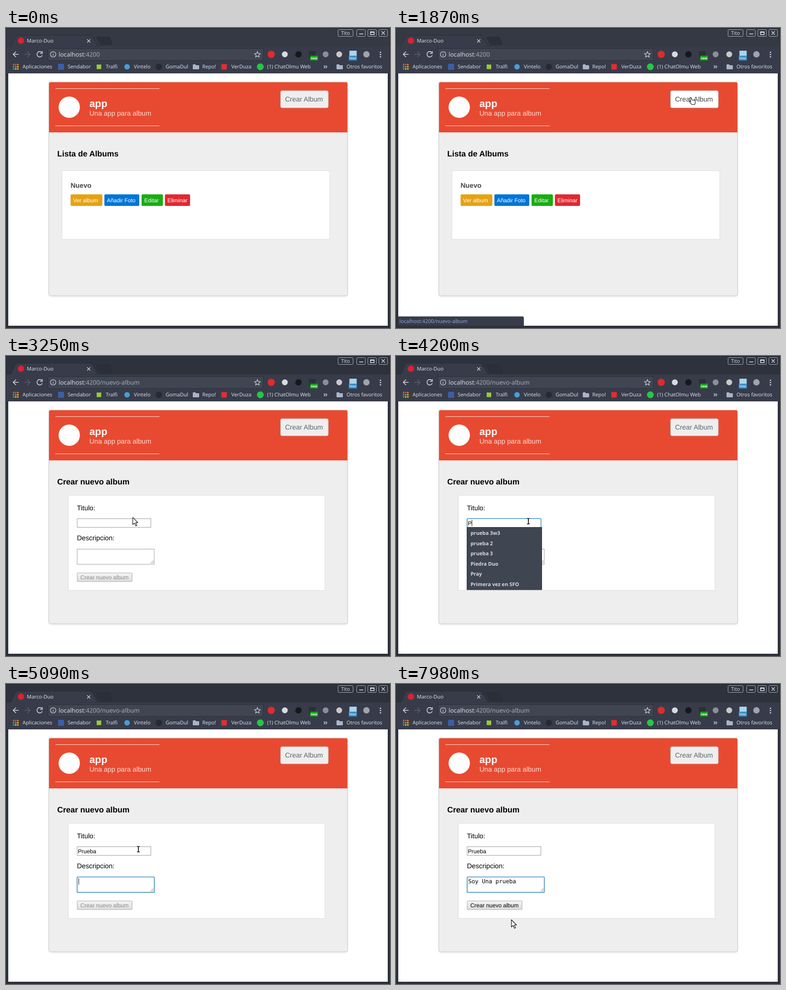
Recreate the animation shown at these times as an HTML page. Size 847x661 px, loop 8 s.

```html
<!DOCTYPE html>
<html lang="es">
<head>
<meta charset="utf-8">
<title>Album</title>
<style>
html, body { margin: 0; width: 100%; height: 100%; overflow: hidden; background: #2b303b; }
svg { display: block; width: 847px; height: 661px; font: 15.04px "Liberation Sans", Arial, sans-serif; text-rendering: geometricPrecision; }
text { white-space: pre; }
.ui { font: 11.25px "Noto Sans", sans-serif; fill: #d3dae3; }
.url { font-size: 13.4px; }
.badge { font-size: 7px; fill: #fff; text-anchor: middle; }
.h3 { font-size: 17.6px; font-weight: bold; }
.small { font-size: 12.22px; fill: #fff; }
.field { font-size: 12.53px; }
.mono { font: 12.53px "DejaVu Sans Mono", monospace; }
.opt { font: bold 11.2px "Noto Sans", sans-serif; fill: #d3dae3; }
.line { fill: none; stroke: #d3dae3; stroke-width: 1.6; }
.box { fill: #fff; stroke: #999; }
.panel { fill: #fff; stroke: #ddd; }
.focus { fill: none; stroke: #3b8fc6; stroke-width: 1.5; }
.cur { fill: #fff; stroke: #000; stroke-width: 1.1; stroke-linejoin: round; }
</style>
</head>
<body>
<svg viewBox="0 0 847 661">
  <defs>
    <linearGradient id="btn" x2="0" y2="1"><stop stop-color="#f5f5f5"/><stop offset="1" stop-color="#dcdcdc"/></linearGradient>
    <filter id="soft" x="-5%" y="-5%" width="110%" height="110%"><feGaussianBlur stdDeviation="2"/></filter>
    <path id="folder" d="M0 1.5q0-1.500 1.500-1.500h4l1.500 2h5.500q1.500 0 1.500 1.500v6q0 1.500-1.500 1.500h-11q-1.500 0-1.500-1.500z" fill="#a9b4c8"/>
  </defs>

  <!-- window -->
  <rect width="847" height="661" fill="#22262f"/>
  <rect x="1" y="1" width="845" height="659" fill="#2d323d"/>
  <rect id="bar" x="1" y="1.500" width="845" height="40"/>
  <path d="M10 42L20 20q1.500-4 6-4H185q4.500 0 6 4l10 17q2 4 6 4z" fill="#383c4a" stroke="#282c35"/>
  <path d="M201 20h25q2 0 3 2l5 12q1 3-2 3h-21q-2 0-3-2l-7-13q-1-2 1-2z" fill="#2b2f39" stroke="#272a33"/>
  <rect x="1" y="41" width="845" height="59" fill="#383c4a"/>
  <circle cx="33" cy="28" r="7" fill="#d9232e"/>
  <g class="ui"><text x="46" y="32">Marco-Duo</text><text x="739" y="15" font-size="11">Tito</text></g>
  <path class="line" d="M179 25l7 7m0-7l-7 7" style="stroke-width:1.200"/>
  <g fill="none" stroke="#aeb4be">
    <rect x="732.500" y="3.500" width="33" height="15" rx="2"/>
    <rect x="773.500" y="3.500" width="19" height="15" rx="2"/>
    <rect x="798" y="3.500" width="19" height="15" rx="2"/>
    <rect x="822.500" y="3.500" width="19" height="15" rx="2"/>
    <path d="M779 13h9M804 8.500h8v6h-8zm0 1h8M828.500 7.500l7 7m0-7l-7 7" stroke="#e6e9ee" stroke-width="1.500"/>
  </g>

  <!-- toolbar -->
  <path class="line" d="M28 58H16m6-6l-6 6 6 6M79 54a6 6 0 1 0 1 6M80 51v5h-5"/>
  <path class="line" d="M41 58h12m-6-6l6 6-6 6" style="stroke:#596070"/>
  <rect x="92.500" y="45.500" width="475" height="26" rx="2.500" fill="#404552" stroke="#2b2e39"/>
  <g class="line" style="stroke-width:1.200">
    <circle cx="104" cy="58" r="6"/><path d="M104 57v4.500m0-7.500v1.500"/>
    <path d="M554.500 52l1.800 4.200 4.500.4-3.400 3 1 4.400-3.900-2.300-3.900 2.300 1-4.400-3.400-3 4.500-.4z"/>
  </g>
  <text class="ui url" x="116" y="63">localhost<tspan id="path" fill="#a2a9b6">:4200</tspan></text>
  <circle cx="585" cy="58" r="8" fill="#df2b2b"/>
  <circle cx="615" cy="58" r="6.500" fill="#d5dce2"/>
  <circle cx="645" cy="58" r="7" fill="#16181c"/>
  <rect x="668" y="51" width="15" height="13" fill="#2b2f38"/>
  <rect x="671" y="61" width="17" height="10.500" fill="#16a716"/>
  <circle cx="705" cy="58" r="6.500" fill="#8b8f96"/>
  <circle cx="735" cy="58" r="6.500" fill="#c9c9c9"/>
  <rect x="757.500" y="50" width="16" height="12" fill="#a9d5ec"/>
  <rect x="756" y="61" width="18" height="10.500" fill="#3a8fcb"/>
  <circle cx="795" cy="58" r="7" fill="#a0a4aa"/>
  <g class="ui badge"><text class="badge" x="679.500" y="68.500" font-weight="bold">new</text><text class="badge" x="765" y="68.500">New</text></g>
  <g fill="#d3dae3"><circle cx="826" cy="53.500" r="1.600"/><circle cx="826" cy="58.500" r="1.600"/><circle cx="826" cy="63.500" r="1.600"/></g>

  <!-- bookmarks -->
  <g id="grid"></g>
  <rect x="115" y="79" width="13" height="13" fill="#3b5fa6"/>
  <rect x="200" y="80.500" width="10" height="10" fill="#98ca3f"/>
  <circle cx="267" cy="85.500" r="6" fill="#459fdd"/>
  <circle cx="337" cy="85.500" r="7" fill="#272a31"/>
  <rect x="475" y="79.500" width="12" height="12" fill="#e02f2f"/>
  <circle cx="561" cy="85.500" r="7.500" fill="#26c644"/>
  <use href="#folder" x="412" y="80"/><use href="#folder" x="729" y="80"/>
  <path d="M718.500 77v17" stroke="#2b2e39"/>
  <path class="line" d="M701 82.500l3 3-3 3m4-6l3 3-3 3" style="stroke-width:1.300"/>
  <g class="ui">
    <text x="36.500" y="89">Aplicaciones</text><text x="136" y="89">Sendabor</text>
    <text x="220" y="89">Tralfi</text><text x="282" y="89">Vintelo</text>
    <text x="352" y="89">GomaDul</text><text x="433" y="89">Repo!</text>
    <text x="497" y="89">VerDuza</text><text x="576" y="89">(1) ChatOlmu Web</text>
    <text x="751" y="89">Otros favoritos</text>
  </g>

  <!-- page -->
  <rect x="5" y="100" width="837" height="556" fill="#fff"/>
  <rect x="95" y="120" width="658" height="471" rx="4" fill="#bbb" opacity=".6" filter="url(#soft)"/>
  <rect x="94.500" y="119.500" width="659" height="470.500" rx="4" fill="#eee" stroke="#c9c9c9"/>
  <path d="M95 230V122q0-2.500 2.500-2.500h653q2.500 0 2.500 2.500v108z" fill="#e84a31"/>
  <path d="M109 133.500h229.500M109 215.500h229.500" stroke="#fff" opacity=".85"/>
  <circle cx="139.500" cy="174.500" r="23.500" fill="#fff"/>
  <text x="184" y="174" fill="#fff" font-size="22.200" font-weight="bold">app</text>
  <text x="184" y="193" fill="#fff" opacity=".8">Una app para album</text>
  <rect id="create" x="605.500" y="138" width="105.500" height="38" rx="3.500" stroke="#bdb1ae"/>
  <text id="createText" x="615.500" y="162">Crear Album</text>

  <g id="listPage">
    <text class="h3" x="113" y="283">Lista de Albums</text>
    <rect class="panel" x="123.500" y="314.500" width="590.500" height="151"/>
    <text x="142.500" y="352" font-weight="bold" fill="#444">Nuevo</text>
    <rect x="142.500" y="366.500" width="70" height="25.500" rx="2.500" fill="#e6a213"/>
    <rect x="217" y="366.500" width="77" height="25.500" rx="2.500" fill="#0275d8"/>
    <rect x="299" y="366.500" width="47" height="25.500" rx="2.500" fill="#18ae12"/>
    <rect x="350.500" y="366.500" width="55.500" height="25.500" rx="2.500" fill="#e2282f"/>
    <g class="small">
      <text x="148" y="384">Ver album</text><text x="222.500" y="384">Añadir Foto</text>
      <text x="305" y="384">Editar</text><text x="356" y="384">Eliminar</text>
    </g>
  </g>

  <g id="formPage">
    <text class="h3" x="113" y="283">Crear nuevo album</text>
    <rect class="panel" x="137.500" y="307" width="566" height="209.500"/>
    <text x="156.500" y="340">Titulo:</text>
    <text x="156.500" y="406">Descripcion:</text>
    <rect class="box" x="157" y="358.500" width="162.500" height="19"/>
    <rect class="box" x="157" y="425.500" width="170" height="33.500"/>
    <path d="M319 457l6.500-6.500m-3 6.500l3-3" stroke="#777" fill="none"/>
    <rect class="focus" id="focus1" x="156.800" y="358.300" width="163" height="19.500" rx="1"/>
    <rect class="focus" id="focus2" x="156.800" y="425.200" width="170.500" height="34" rx="1"/>
    <rect x="157" y="478" width="121" height="19" rx="1" fill="url(#btn)" stroke="#a8a8a8"/>
    <text class="field" id="send" x="164" y="492">Crear nuevo album</text>
    <text class="field" id="title" x="158.500" y="372.500"></text>
    <text class="mono" id="desc" x="159.300" y="439"></text>
    <rect id="caret" width="1" height="14"/>
    <g id="list"><rect id="listBox" x="156.500" y="377.500" width="165" fill="#404552" stroke="#2b2e39"/></g>
  </g>

  <g id="status">
    <path d="M5 656v-20.500h273.500q3.500 0 3.500 3.500v17z" fill="#383c4a"/>
    <text class="ui" x="7.500" y="650" style="fill:#8ba6d6">localhost:4200/nuevo-album</text>
  </g>

  <g id="mouse">
    <path class="cur" id="arrow" d="M.5.500V16.500L4.300 13 7.200 19.300 9.700 18.200 6.900 12H11.800z"/>
    <path class="cur" id="hand" d="M-2 1q1.500-2 3 0l1.500 4.500 5.500.8q2 .5 2 2.700l-.4 4-1.100 2.500H2l-4.800-5.800q-.6-1.900 1.300-1.500l1.500 1z"/>
    <g id="beam" fill="none"><path d="M-3-6h6M-3 6h6M0-6v12" stroke="#fff" stroke-width="4"/><path d="M-3-6h2l1 1 1-1h2M-3 6h2l1-1 1 1h2M0-5v10" stroke="#000" stroke-width="1.700"/></g>
  </g>
</svg>
<script>
const LOOP = 8000, CLICK = 2310, FOCUS = 3490, TAB = 4890;
const $ = id => document.getElementById(id);
const NS = 'http://www.w3.org/2000/svg';
const show = (id, on) => $(id).setAttribute('visibility', on ? 'inherit' : 'hidden');
const ramp = (t, from, ms) => Math.min(1, Math.max(0, (t - from) / ms));

function add(parent, tag, attrs) {
  const el = document.createElementNS(NS, tag);
  for (const k in attrs) el.setAttribute(k, attrs[k]);
  return parent.appendChild(el);
}

['#e5493a', '#e5493a', '#e8793a', '#36a35f', '#4a90e0', '#f4b400', '#36a35f', '#f4b400', '#f4b400'].forEach((fill, i) =>
  add($('grid'), 'rect', { x: 15 + i % 3 * 4.7, y: 79 + Math.floor(i / 3) * 4.7, width: 3.3, height: 3.3, fill }));

const options = ['prueba 3w3', 'prueba 2', 'prueba 3', 'Piedra Duo', 'Pray', 'Primera vez en SFO'].map(name => {
  const el = add($('list'), 'text', { class: 'opt', x: 164.5 });
  el.textContent = name;
  return { name, el };
});

const titleKeys = [4200, 4370, 4450, 4530, 4640, 4730];
const descKeys = [5340, 5430, 5630, 5780, 5960, 6110, 6200, 6280, 6370, 6450, 6540, 6850, 6940, 7030];
const typed = (text, keys, t) => text.slice(0, keys.filter(k => k <= t).length);

// Each move: [time, x, y] points, at rest on both ends.
const moves = [
  [[410, 536, 645], [600, 440, 330], [760, 290, 139], [900, 186, 230], [1030, 168, 365], [1180, 212, 413]],
  [[1200, 212, 413], [1500, 400, 300], [1750, 602, 183], [1950, 659, 147]],
  [[2420, 659, 147], [2630, 440, 262], [2880, 277, 352]],
  [[3210, 277, 352], [3250, 279, 355], [3410, 292, 364]],
  [[7580, 292, 364], [7690, 288, 425], [7800, 268, 520], [7890, 254, 555], [7980, 254, 519]]
];

function pointer(t) {
  const p = moves.filter(m => m[0][0] <= t).pop() || moves[0];
  const last = p.length - 1;
  if (t >= p[last][0]) return p[last].slice(1);
  const i = Math.max(0, p.findIndex(k => k[0] > t) - 1);
  const a = p[i], b = p[i + 1], dt = b[0] - a[0], u = (t - a[0]) / dt;
  const slope = (j, c) => j <= 0 || j >= last ? 0 : (p[j + 1][c] - p[j - 1][c]) / (p[j + 1][0] - p[j - 1][0]) * dt;
  return [1, 2].map(c => {
    const s = u * u * (3 - 2 * u);
    return a[c] + (b[c] - a[c]) * s + slope(i, c) * u * (1 - u) ** 2 - slope(i + 1, c) * u * u * (1 - u);
  });
}

const inside = (x, y, l, t, r, b) => x >= l && x <= r && y >= t && y <= b;

function drawForm(t) {
  const title = typed('Prueba', titleKeys, t), desc = typed('Soy Una prueba', descKeys, t);
  $('title').textContent = title;
  $('desc').textContent = desc;
  $('send').setAttribute('fill', desc ? '#000' : '#8f8f8f');
  $('focus1').setAttribute('opacity', t < TAB ? ramp(t, FOCUS - 80, 80) : 1 - ramp(t, TAB, 160));
  $('focus2').setAttribute('opacity', ramp(t, TAB, 160));

  const inDesc = t >= TAB, field = $(inDesc ? 'desc' : 'title');
  const length = field.textContent ? field.getComputedTextLength() : 0;
  $('caret').setAttribute('x', Math.round(159 + length + (inDesc ? .6 : 0)));
  $('caret').setAttribute('y', inDesc ? 428 : 361);
  show('caret', t >= FOCUS && t < 7610 && !(t >= 4050 && t < 4200));

  let rows = 0;
  for (const { name, el } of options) {
    const match = name.toLowerCase().startsWith(title.toLowerCase());
    el.setAttribute('visibility', match ? 'inherit' : 'hidden');
    if (match) el.setAttribute('y', 394 + 22.55 * rows++);
  }
  $('listBox').setAttribute('height', 22.55 * rows + 2.2);
  show('list', title && t < TAB);
}

function draw(t) {
  const form = t >= CLICK, [x, y] = pointer(t);
  const hover = t >= 410 && inside(x, y, 605, 138, 711, 176);
  const hand = hover || !form && inside(x, y, 142, 366, 406, 392);
  const beam = form && (inside(x, y, 157, 358, 320, 378) || inside(x, y, 157, 425, 327, 459));

  $('bar').setAttribute('fill', form ? '#2d323c' : '#343944');
  $('path').textContent = form ? ':4200/nuevo-album' : ':4200';
  $('create').setAttribute('fill', hover ? '#fff' : '#eee');
  $('createText').setAttribute('fill', hover ? '#444' : '#5f686d');
  show('listPage', !form);
  show('formPage', form);
  show('status', hover);
  if (form) drawForm(t);

  show('mouse', t >= 410);
  show('hand', hand);
  show('beam', beam);
  show('arrow', !hand && !beam);
  $('mouse').setAttribute('transform', `translate(${x.toFixed(1)} ${y.toFixed(1)})`);
}

const start = performance.now();
function tick() {
  draw((performance.now() - start) % LOOP);
  requestAnimationFrame(tick);
}
tick();
</script>
</body>
</html>
```
